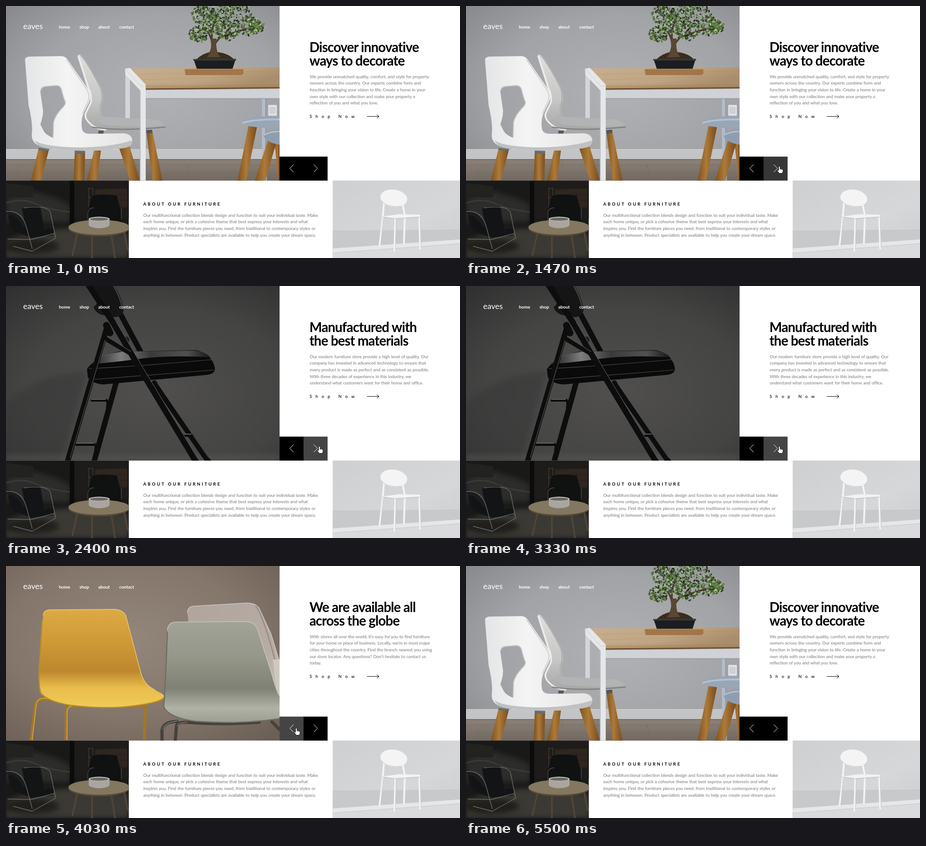
These frames come from a looping animation (1004x558 px, 6010 ms). An HTML page:

```html
<!DOCTYPE html>
<html lang="en">
<head>
<meta charset="utf-8">
<title>Furniture store</title>
<style>
html, body { margin: 0; width: 100%; height: 100%; overflow: hidden; background: #fff; }
#stage { display: block; font-family: Lato, "Open Sans", sans-serif; font-weight: 700; }
.head { font-size: 29.5px; letter-spacing: -.85px; fill: #000; }
.copy { font-size: 10px; letter-spacing: -.3px; word-spacing: .6px; fill: #9d9d9d; }
.nav { font-size: 10px; letter-spacing: -.1px; fill: #fff; }
.brand { font-size: 17.5px; font-weight: 400; fill: #fff; }
.about { font-size: 9.5px; letter-spacing: 3.22px; }
.shop { font-size: 9.5px; font-weight: 500; letter-spacing: 8px; }
.line { fill: none; stroke: #fff; stroke-width: 1; }
.soft { filter: blur(6px); }
.tube { fill: none; stroke-linecap: round; stroke-linejoin: round; }

.slide, #prev, #next, #cursor, #arrow, #hand { animation: 6010ms linear infinite; }
.slide { animation-timing-function: step-end; }
#s1 { animation-name: first; }
#s2 { animation-name: second; }
#s3 { animation-name: third; }
@keyframes first { 0%, 76.04% { visibility: visible } 27.12% { visibility: hidden } }
@keyframes second { 0%, 39.93%, 76.04% { visibility: hidden } 27.12%, 64.89% { visibility: visible } }
@keyframes third { 0%, 64.89% { visibility: hidden } 39.93% { visibility: visible } }

#next { animation-name: next; }
#prev { animation-name: prev; }
@keyframes next {
  0%, 20.55% { fill: #000 }
  24.46%, 27% { fill: #363636 }
  27.7%, 59.57% { fill: #444 }
  65.39%, 100% { fill: #000 }
}
@keyframes prev {
  0%, 59.57% { fill: #000 }
  65.39%, 85.36% { fill: #444 }
  90.35%, 100% { fill: #000 }
}

#cursor { animation-name: move; }
@keyframes move {
  0%, 13.3% { transform: translate(968px, 268px); visibility: hidden }
  13.31% { transform: translate(968px, 268px); visibility: visible; animation-timing-function: cubic-bezier(.3, .2, .5, 1) }
  22.8% { transform: translate(693px, 355px) }
  55.41% { transform: translate(693px, 355px); animation-timing-function: ease-in-out }
  62.56% { transform: translate(642px, 359px) }
  82.7% { transform: translate(642px, 359px); animation-timing-function: cubic-bezier(.5, 0, .7, .6) }
  89.02% { transform: translate(1012px, 290px); visibility: visible }
  89.03%, 100% { transform: translate(1012px, 290px); visibility: hidden }
}
#arrow { animation-name: arrow; animation-timing-function: step-end; }
#hand { animation-name: hand; animation-timing-function: step-end; }
@keyframes arrow { 0%, 86% { opacity: 1 } 20.55% { opacity: 0 } }
@keyframes hand { 0%, 86% { opacity: 0 } 20.55% { opacity: 1 } }
</style>
</head>
<body>
<svg id="stage" width="1004" height="558" viewBox="0 0 1004 558">
<defs>
  <radialGradient id="wall" cx=".56" cy=".5" r=".75">
    <stop stop-color="#b0b1b4"/><stop offset=".6" stop-color="#a2a3a6"/><stop offset="1" stop-color="#88898c"/>
  </radialGradient>
  <linearGradient id="floor" x2="0" y2="1"><stop stop-color="#8b8278"/><stop offset="1" stop-color="#716860"/></linearGradient>
  <linearGradient id="shell"><stop stop-color="#e4e5e6"/><stop offset=".4" stop-color="#f4f4f4"/><stop offset="1" stop-color="#e4e4e5"/></linearGradient>
  <linearGradient id="back" x2="0" y2="1"><stop stop-color="#dededd"/><stop offset=".6" stop-color="#c6c6c4"/><stop offset="1" stop-color="#a6a6a6"/></linearGradient>
  <linearGradient id="oak" x2="1" y2=".4"><stop stop-color="#c6af90"/><stop offset=".6" stop-color="#bfa582"/><stop offset="1" stop-color="#a98d6c"/></linearGradient>
  <linearGradient id="leg"><stop stop-color="#7d5120"/><stop offset=".45" stop-color="#ad7a38"/><stop offset="1" stop-color="#784a1e"/></linearGradient>
  <radialGradient id="taupe" cx=".45" cy=".42" r=".8">
    <stop stop-color="#93867b"/><stop offset=".55" stop-color="#84766b"/><stop offset="1" stop-color="#695c52"/>
  </radialGradient>
  <linearGradient id="yellow" x2="0" y2="1">
    <stop stop-color="#dcaa45"/><stop offset=".3" stop-color="#d09b37"/><stop offset=".63" stop-color="#bd882e"/>
    <stop offset=".8" stop-color="#e9bd4b"/><stop offset="1" stop-color="#efcb58"/>
  </linearGradient>
  <linearGradient id="sage" x2="0" y2="1">
    <stop stop-color="#a2a398"/><stop offset=".35" stop-color="#959789"/><stop offset=".66" stop-color="#7f8174"/>
    <stop offset=".86" stop-color="#b1b2a6"/><stop offset="1" stop-color="#9c9e90"/>
  </linearGradient>
  <linearGradient id="blush" x2="1" y2="1"><stop stop-color="#b0a59d"/><stop offset=".7" stop-color="#b8ada6"/><stop offset="1" stop-color="#cbc2bb"/></linearGradient>
  <radialGradient id="dark" cx=".55" cy=".6" r=".8">
    <stop stop-color="#504f4e"/><stop offset=".6" stop-color="#444443"/><stop offset="1" stop-color="#303030"/>
  </radialGradient>
  <linearGradient id="gloss"><stop stop-color="#202020"/><stop offset=".25" stop-color="#a3a3a2"/><stop offset=".5" stop-color="#4a4a49"/><stop offset=".8" stop-color="#6a6a69"/><stop offset="1" stop-color="#191919"/></linearGradient>
  <linearGradient id="pale" x2="1" y2="1"><stop stop-color="#cecfd1"/><stop offset=".6" stop-color="#d6d7d9"/><stop offset="1" stop-color="#cbccce"/></linearGradient>
</defs>
<rect width="1004" height="558" fill="#fff"/>

<g id="s1" class="slide">
  <svg width="605" height="386.6">
    <rect width="605" height="387" fill="url(#wall)"/>
    <rect y="317" width="605" height="23" fill="#c3c4c6"/>
    <path d="M0 317.5H605" stroke="#d8d9da"/>
    <rect y="339" width="605" height="48" fill="url(#floor)"/>
    <path d="M0 340H605" stroke="#6b6259" stroke-width="1.5"/>
    <path d="M0 352H605M0 369H605M40 352L22 369M215 340L210 352M400 352L405 369M480 369L490 387M130 369L110 387" stroke="#6e6459" stroke-opacity=".6"/>
    <rect x="580" y="219" width="19" height="24" rx="1" fill="#e0e1e3"/>
    <rect x="584" y="225" width="11" height="12" fill="#cfd1d3" stroke="#b4b6b9" stroke-width=".7"/>
    <path d="M264 140H274V250H264Z" fill="#d3d5d8"/>
    <rect x="566" y="204" width="11" height="183" fill="#b3bcc7"/>
    <rect x="573" y="204" width="4" height="183" fill="#94a0ad"/>
    <g fill="url(#leg)">
      <path d="M205 276H216L201 387H179Z"/><path d="M310 275L323 274 346 387H324Z"/>
      <path d="M536 266L555 268 531 387H512Z"/><path d="M579 298L598 302 573 387H550Z"/><path d="M595 306H605V387H601Z"/>
    </g>
    <path d="M205 276L216 277 215 283 204 281ZM310 275L323 274 324 281 311 282Z" fill="#53565a"/>
    <path d="M523 259Q528 246 560 245L605 243V271Q538 271 523 259Z" fill="#98a6b6"/>
    <path d="M523 259Q545 251 605 251" fill="none" stroke="#b5c0cc" stroke-width="4"/>
    <path d="M569 286Q578 273 605 274V307Q573 302 569 286Z" fill="#8f9eaf"/>
    <path d="M570 286Q585 277 605 278" fill="none" stroke="#b5c0cc" stroke-width="3"/>

    <path d="M158 112Q159 106 165 108Q176 116 208 176Q216 190 214 212Q206 230 216 245Q260 248 330 251Q354 257 353 268Q300 277 222 276Q196 274 186 262Q170 250 174 237L186 213Q187 195 180 183Z" fill="url(#back)"/>
    <path d="M216 246Q260 249 330 252Q350 258 348 265Q275 270 215 262Q200 255 203 237Z" fill="#b2b3b4"/>
    <path d="M160 111L183 183Q190 197 188 213L176 238Q173 250 188 262Q198 272 222 274" fill="none" stroke="#ececec" stroke-width="3.5"/>
    <path d="M164 109Q176 118 207 177Q214 190 212 211Q204 230 213 245" fill="none" stroke="#aaaaa8" stroke-width="2"/>
    <path d="M190 268Q250 278 353 268" fill="none" stroke="#7f7f80" stroke-width="2.5"/>

    <path d="M268 138L605 136V181L307 184Z" fill="url(#oak)"/>
    <path d="M290 151L605 144M300 163L605 155M306 174L605 168" stroke="#a98c69" stroke-opacity=".4"/>
    <path d="M307 176L605 173V181L307 184Z" fill="#a38159" opacity=".45"/>
    <path d="M307 184L605 181" stroke="#6d4e30" stroke-width="3"/>
    <path d="M307 186L605 183V205H307Z" fill="#cfd2d6"/>
    <path d="M307 205H605" stroke="#9699a0" stroke-width="1.5"/>
    <path d="M263 139L274 137 309 174V387H297V187L264 152Z" fill="#e6e7e8"/>
    <path d="M297 187V387" stroke="#bfc1c3" stroke-width="2"/>
    <path d="M264 140L298 177H309" fill="none" stroke="#c9cbcd"/>

    <g fill="url(#leg)">
      <path d="M72 316L95 318 77 387H55Z"/><path d="M152 321H175L173 387H150Z"/><path d="M250 314L273 310 296 387H275Z"/>
    </g>
    <path d="M152 319H175V327H152ZM73 314L96 317 94 321 71 319Z" fill="#686b6e"/>
    <path d="M42 118Q43 113 52 112L122 111Q130 111 135 117L180 182Q190 197 184 212L172 236Q165 252 168 272Q170 283 186 283L262 282Q280 285 279 299Q278 312 262 314Q220 322 150 320Q90 318 70 308Q56 300 57 284Q60 262 50 220ZM76 190Q77 179 88 178L112 176Q121 177 123 186Q127 204 131 212Q133 217 124 226Q108 243 105 258Q106 272 104 292Q88 285 84 278L76 262Q82 245 82 232Z" fill="url(#shell)" fill-rule="evenodd"/>
    <path d="M62 296Q75 310 150 313Q225 314 278 298Q279 312 262 314Q220 322 150 320Q90 318 70 308Z" fill="#c0c1c3"/>
    <path d="M76 190Q77 179 88 178L112 176Q121 177 123 186Q127 204 131 212Q133 217 124 226Q108 243 105 258L104 292" fill="none" stroke="#c3c4c6" stroke-width="2"/>
    <path d="M133 118L178 184Q187 198 181 212L169 238" fill="none" stroke="#cfd0d1" stroke-width="2"/>

    <path d="M395 140H525V150L520 153H397Z" fill="#a2754a"/>
    <path d="M395 140L415 137H517L525 140Z" fill="#c29d6e"/>
    <path d="M415 118L508 117 501 139H422Z" fill="#1b1e20"/>
    <path d="M414 119H509" stroke="#343b41" stroke-width="3"/>
    <path d="M421 118Q436 104 456 101Q488 102 503 117Z" fill="#3a2d1d"/>
    <path d="M446 113Q460 95 454 74Q450 60 440 48M458 90Q470 70 492 52M456 76Q452 50 468 18M470 70L545 46" class="tube" stroke="#4d3c2b" stroke-width="4"/>
    <path d="M446 114Q458 96 453 72H466Q462 98 474 113Z" fill="#584833"/>
    <g id="leaves"></g>
  </svg>
  <text class="head"><tspan x="671" y="102">Discover innovative</tspan><tspan x="671" y="131.5">ways to decorate</tspan></text>
  <text class="copy"><tspan x="671.5" y="159.8">We provide unmatched quality, comfort, and style for property</tspan><tspan x="671.5" dy="14.65">owners across the country. Our experts combine form and</tspan><tspan x="671.5" dy="14.65">function in bringing your vision to life. Create a home in your</tspan><tspan x="671.5" dy="14.65">own style with our collection and make your property a</tspan><tspan x="671.5" dy="14.65">reflection of you and what you love.</tspan></text>
</g>

<g id="s2" class="slide">
  <svg width="605" height="386.6">
    <rect width="605" height="387" fill="url(#taupe)"/>
    <path d="M401 100Q402 90 414 89L530 82Q552 81 560 94L586 150L605 212V292H420Z" fill="url(#blush)"/>
    <path d="M401 104Q402 90 414 89L530 82Q552 81 560 94L586 150L605 212" fill="none" stroke="#cfc6bf" stroke-width="1.5"/>
    <path d="M552 88Q566 105 590 190L605 250" fill="none" stroke="#9b8f86" stroke-width="3"/>
    <path d="M590 207H605V292H600Z" fill="#d0c7c1"/>
    <g class="tube" stroke="#a1772a" stroke-width="7">
      <path d="M95 296Q70 290 65 308L55 390M133 390V322Q134 310 148 309H300M308 308L306 390M330 300L351 290"/>
      <path d="M93 294Q72 289 67 305L58 385M135 385V323Q136 311 150 308" stroke="#cfa244" stroke-width="2"/>
    </g>
    <path d="M82 110Q83 98 96 97L240 96Q258 97 265 110L298 236Q304 262 330 275Q352 285 350 290Q345 302 280 310Q220 318 140 308Q90 300 76 282Q70 268 76 190Z" fill="url(#yellow)"/>
    <path d="M82 110Q83 98 96 97L240 96Q258 97 265 110L298 236Q304 262 330 275" fill="none" stroke="#efca6a" stroke-width="1.5"/>
    <path d="M80 120L75 200Q70 262 77 281Q92 300 140 308Q220 318 280 310Q345 302 350 290" fill="none" stroke="#b58a2f" stroke-width="2.5"/>
    <g class="tube" stroke="#45423c" stroke-width="7">
      <path d="M345 390V364Q348 345 378 344M374 390L377 354Q379 345 400 346Q470 352 560 346M588 345L605 362"/>
      <path d="M347 362Q350 347 378 343M379 354Q381 347 400 346" stroke="#817d74" stroke-width="1.5"/>
    </g>
    <path d="M357 142Q358 125 376 124L530 123Q550 124 556 140L588 240Q597 275 605 288V338Q520 351 420 344Q360 336 349 312Q354 230 357 142Z" fill="url(#sage)"/>
    <path d="M357 142Q358 125 376 124L530 123Q550 124 556 140L588 240Q597 275 605 288" fill="none" stroke="#c4c5ba" stroke-width="1.5"/>
    <path d="M357 146Q354 230 349 312Q360 336 420 344Q520 351 605 338" fill="none" stroke="#6d6f62" stroke-width="2.5"/>
  </svg>
  <text class="head"><tspan x="671" y="102">We are available all</tspan><tspan x="671" y="131.5">across the globe</tspan></text>
  <text class="copy"><tspan x="671.5" y="159.8">With stores all over the world, it's easy for you to find furniture</tspan><tspan x="671.5" dy="14.65">for your home or place of business. Locally, we're in most major</tspan><tspan x="671.5" dy="14.65">cities throughout the country. Find the branch nearest you using</tspan><tspan x="671.5" dy="14.65">our store locator. Any questions? Don't hesitate to contact us</tspan><tspan x="671.5" dy="14.65">today.</tspan></text>
</g>

<g id="s3" class="slide">
  <svg width="605" height="386.6">
    <rect width="605" height="387" fill="url(#dark)"/>
    <path d="M0 260Q80 190 180 190L120 387H0Z" fill="#363636" opacity=".5" class="soft"/>
    <rect y="374" width="605" height="13" fill="#5b5b5a" opacity=".5" class="soft"/>
    <g class="tube" stroke="#0d0d0d">
      <path d="M252 60L300 150M328 215L450 392" stroke-width="12"/>
      <path d="M244 212L194 392" stroke-width="12"/>
      <path d="M190 253H222Q227 257 224 268M156 351H196Q201 354 198 362M394 331H412" stroke-width="6"/>
      <path d="M189 251H220M155 348H194M394 328H410" stroke="#797978" stroke-width="1.5"/>
    </g>
    <path d="M176 0H240Q258 30 260 54Q256 68 240 69L212 64Q196 58 194 46Q208 38 196 14Z" fill="#151515"/>
    <path d="M238 0Q255 30 257 52" fill="none" stroke="#4d4d4c" stroke-width="2"/>
    <circle cx="266" cy="119" r="7" fill="#202222"/>
    <path d="M179 184Q196 158 250 145L420 142Q456 150 462 182Q463 195 442 197L215 218Q190 216 181 202Z" fill="#0a0a0a"/>
    <path d="M188 173Q210 150 260 145L418 143Q446 148 452 158Q360 152 290 162Q230 170 188 173Z" fill="url(#gloss)" opacity=".75"/>
    <path d="M183 183Q290 178 455 163M193 207Q300 199 460 186" fill="none" stroke="#4c4c4b" stroke-width="1.2"/>
    <g class="tube" stroke="#0d0d0d">
      <path d="M223 92L135 392" stroke-width="12"/>
      <path d="M219 116L280 152" stroke-width="10"/>
      <path d="M180 -6L238 83 302 193 422 392" stroke-width="13"/>
      <path d="M222 87L230 104" stroke-width="15"/>
      <path d="M219 120L142 380M224 112L276 145M244 80L306 186 424 382M335 215L448 380" stroke="#565655" stroke-width="1.2"/>
    </g>
  </svg>
  <text class="head"><tspan x="671" y="102">Manufactured with</tspan><tspan x="671" y="131.5">the best materials</tspan></text>
  <text class="copy"><tspan x="671.5" y="159.8">Our modern furniture store provide a high level of quality. Our</tspan><tspan x="671.5" dy="14.65">company has invested in advanced technology to ensure that</tspan><tspan x="671.5" dy="14.65">every product is made as perfect and as consistent as possible.</tspan><tspan x="671.5" dy="14.65">With three decades of experience in this industry, we</tspan><tspan x="671.5" dy="14.65">understand what customers want for their home and office.</tspan></text>
</g>

<text class="brand" x="38" y="50.5">eaves</text>
<g class="nav"><text x="117" y="49.5">home</text><text x="162.5" y="49.5">shop</text><text x="204" y="49.5">about</text><text x="250.5" y="49.5">contact</text></g>
<text class="shop" x="671.5" y="248">Shop Now</text>
<path class="line" style="stroke:#000" d="M798 244.5H825M820 240.5L825 244.5 820 248.5"/>

<rect id="prev" x="605" y="333.5" width="53.2" height="53.1"/>
<rect id="next" x="658" y="333.5" width="53.2" height="53.1"/>
<path class="line" d="M636 351L627.5 359.5 636 368M680.5 351L689 359.5 680.5 368"/>

<svg y="386.6" width="271.5" height="171.4" viewBox="0 386.6 271.5 171.4">
  <rect y="386" width="272" height="172" fill="#191918"/>
  <path d="M150 387H272V470H150Z" fill="#1d1c1a"/>
  <path d="M0 520Q120 474 272 505V558H0Z" fill="#3b3934" class="soft"/>
  <path d="M0 428Q30 405 62 412Q100 418 141 440V478H0Z" fill="#2c2c2b" class="soft"/>
  <path d="M0 436Q40 424 70 440Q100 452 141 456" fill="none" stroke="#3a3a38" stroke-width="3"/>
  <path d="M0 392L60 399V424H0Z" fill="#222221"/>
  <path d="M197 406L268 404V446H197Z" fill="#2e261f"/>
  <path d="M198 418H268M198 430H268" stroke="#221c17"/>
  <path d="M183 403V462M192 403V462M183 404H192M183 424H192" stroke="#4b4235" stroke-width="1.2"/>
  <rect x="141" y="387" width="10" height="105" fill="#0c0c0c"/>
  <path d="M190 420Q215 415 245 420L256 462V478H180V456Z" fill="#101111"/>
  <path class="tube" d="M181 482V458Q183 447 194 447M255 472V448" stroke="#4c4d4c" stroke-width="1.3"/>
  <ellipse cx="55" cy="532" rx="62" ry="17" fill="#201f1c" class="soft"/>
  <path d="M35 449Q50 441 76 443L84 494Q104 488 106 497L104 508 56 513 16 498Q2 474 6 461Q22 466 42 482Z" fill="#131415"/>
  <path d="M0 455Q26 460 42 488" fill="none" stroke="#1a1c1e" stroke-width="8"/>
  <path class="tube" d="M0 455Q34 452 44 486L58 537M40 447Q88 440 98 456L110 514M16 532L58 543 110 514M4 516L56 517 106 504" stroke="#6c6e6b" stroke-width="1.4"/>
  <path class="tube" d="M158 502L147 552M190 507V558M233 506L241 558M261 499L269 540" stroke="#4f4535" stroke-width="4"/>
  <ellipse cx="206" cy="492" rx="68" ry="18" fill="#564b3b"/>
  <ellipse cx="206" cy="490" rx="68" ry="16.5" fill="#83775f"/>
  <path d="M183 471V486Q190 492 206 492Q222 492 229 486V471Z" fill="#a9a5a0"/>
  <ellipse cx="206" cy="471.5" rx="23" ry="5" fill="#c8c5c0"/>
  <ellipse cx="206" cy="472" rx="20.5" ry="3.5" fill="#6b6761"/>
</svg>

<text class="about" x="303.5" y="442">ABOUT OUR FURNITURE</text>
<text class="copy"><tspan x="303.5" y="466.8">Our multifunctional collection blends design and function to suit your individual taste. Make</tspan><tspan x="303.5" dy="14.65">each home unique, or pick a cohesive theme that best express your interests and what</tspan><tspan x="303.5" dy="14.65">inspires you. Find the furniture pieces you need, from traditional to contemporary styles or</tspan><tspan x="303.5" dy="14.65">anything in between. Product specialists are available to help you create your dream space.</tspan></text>

<svg x="722.5" y="386.6" width="281.5" height="171.4" viewBox="722.5 386.6 281.5 171.4">
  <rect x="722" y="386" width="283" height="172" fill="url(#pale)"/>
  <path d="M722 497L1004 495V558H722Z" fill="#c8c9cb"/>
  <path d="M722 537L1004 517V558H722Z" fill="#dadbdc"/>
  <path d="M722 537L1004 517V526L722 547Z" fill="#e6e7e8"/>
  <path d="M722 547L1004 526" stroke="#c5c6c8"/>
  <g class="tube" stroke="#f4f4f5" stroke-width="4">
    <path d="M836 436L831 490 826 530M861 468L859 542M882 468L880 525M914 465L916 537M877 438L882 464"/>
    <path d="M863 470L861 540M916 470L918 535M834 470L829 528" stroke="#c3c4c6" stroke-width="1"/>
  </g>
  <path d="M831 466L870 461 913 462 918 466 860 470Z" fill="#f3f3f4"/>
  <path d="M831 467L860 471 918 467" fill="none" stroke="#bfc0c2"/>
  <ellipse cx="857.5" cy="425.5" rx="30" ry="19" transform="rotate(8 857.5 425.5)" fill="#f4f4f5"/>
  <path d="M830 430Q842 447 876 443" fill="none" stroke="#c6c7c9"/>
</svg>

<g id="cursor" fill="#fff" stroke="#000" stroke-width=".8" stroke-linejoin="round">
  <path id="arrow" d="M0 0V12L2.8 9.5 4.6 13.8 6.5 13 4.7 8.8H8.5Z"/>
  <g id="hand">
    <path d="M-1.6 1.2Q-1.4 0 0 0Q1.4 0 1.6 1.2V5.2L6 6Q8 6.4 8 8.2V11.5L6.5 15.5H0L-4.3 10Q-5 8.6 -3.8 8.2Q-2.8 8 -1.6 9.6Z"/>
    <path d="M1.6 5V8M3.8 5.8V8.2M6 6.2V8.5" fill="none" stroke-width=".6"/>
  </g>
</g>
</svg>
<script>
// Scatter leaves over a few round clumps, dark ones first.
let seed = 7;
const rnd = () => (seed = seed * 16807 % 2147483647) / 2147483647;
const clumps = [[438, 20, 25], [468, 12, 32], [505, 18, 34], [536, 44, 25], [427, 62, 20], [490, 55, 24], [554, 46, 15], [460, 40, 24]];
const shades = ["#202d19", "#34492a", "#4c6a35", "#6e8b4e", "#a8bc8e"];
const counts = [30, 32, 26, 16, 7];

const leaf = ([cx, cy, r]) => {
  const a = rnd() * 2 * Math.PI, d = r * Math.sqrt(rnd());
  const x = cx + d * Math.cos(a) * 1.1, y = cy + d * Math.sin(a) * .9;
  const w = 2 + rnd() * 2.2, t = rnd() * Math.PI;
  const dx = w * Math.cos(t), dy = w * Math.sin(t);
  const pt = (u, v) => (x + u).toFixed(1) + " " + (y + v).toFixed(1);
  return `M${pt(-dx, -dy)}Q${pt(-dy, dx)} ${pt(dx, dy)}Q${pt(dy, -dx)} ${pt(-dx, -dy)}`;
};

document.getElementById("leaves").innerHTML = shades.map((fill, i) => {
  const d = clumps.map(c => Array.from({ length: counts[i] }, () => leaf(c)).join("")).join("");
  return `<path fill="${fill}" d="${d}"/>`;
}).join("");
</script>
</body>
</html>
```
